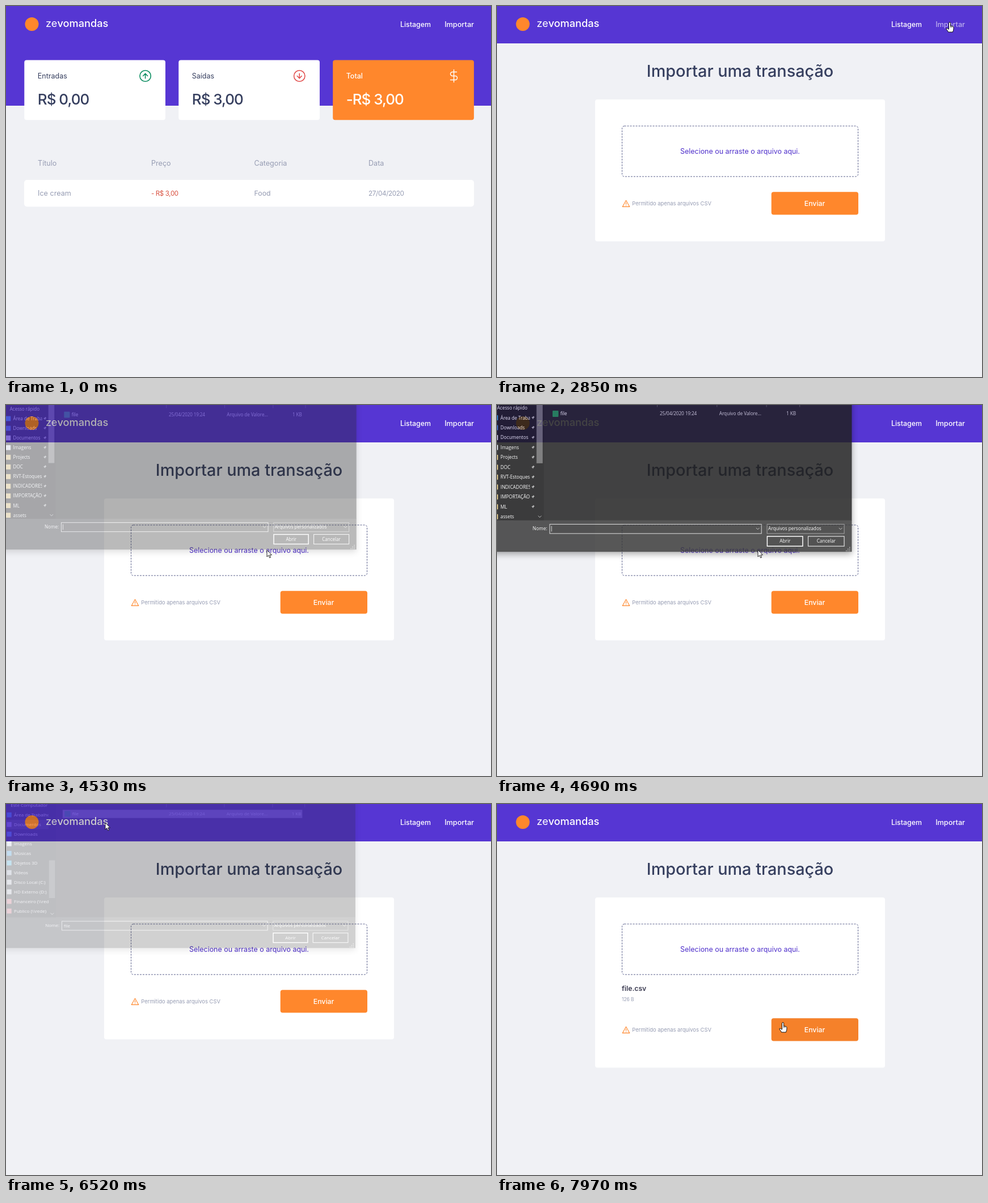
An HTML page for the animation above (8000 ms loop, 855x655 px).

```html
<!DOCTYPE html>
<html lang="pt-BR">
<head>
<meta charset="utf-8">
<title>Importar uma transação</title>
<style>
html, body { margin: 0; width: 100%; height: 100%; overflow: hidden; background: #f0f1f5; }
svg { display: block; width: 100vw; height: 100vh; }
text { font-family: Inter, "Open Sans", sans-serif; white-space: pre; }
#dialog text { font-family: "Open Sans", "Noto Sans", sans-serif; font-size: 8.3px; }
#dialog { filter: drop-shadow(0 4px 6px rgba(0, 0, 0, .4)); }
</style>
</head>
<body>
<svg id="stage" viewBox="0 0 855 655" xmlns="http://www.w3.org/2000/svg"></svg>
<script>
const LOOP = 8000;
const PURPLE = '#5636d3', ORANGE = '#ff872c', NAVY = '#363f5f', GREY = '#969cb3';
const stage = document.getElementById('stage');

// Markup helpers
const text = (x, y, str, size, fill, weight = 400, extra = '') =>
  `<text x="${x}" y="${y}" font-size="${size}" fill="${fill}" font-weight="${weight}" ${extra}>${str}</text>`;
const rect = (x, y, w, h, fill, extra = '') =>
  `<rect x="${x}" y="${y}" width="${w}" height="${h}" fill="${fill}" ${extra}/>`;
const line = (d, stroke, width, extra = '') =>
  `<path d="${d}" fill="none" stroke="${stroke}" stroke-width="${width}" stroke-linecap="round" stroke-linejoin="round" ${extra}/>`;
const MID = 'text-anchor="middle"', END = 'text-anchor="end"';

function summaryCard(x, label, value, fill, ink, icon) {
  return rect(x, 95.5, 248.7, 105.7, fill, 'rx="4"') +
    text(x + 23.5, 128, label, 12.5, ink, ink === '#fff' ? 500 : 400) +
    text(x + 23.5, 174, value, 26, ink, 500, 'letter-spacing="-1"') + icon;
}

function roundArrow(x, color, dir) {
  const tip = 123.5 - 4.2 * dir, wing = tip + 4.2 * dir;
  return `<circle cx="${x}" cy="123.5" r="9.7" fill="none" stroke="${color}" stroke-width="1.6"/>` +
    line(`M${x} ${123.5 + 4.2 * dir}V${tip}M${x - 4} ${wing}L${x} ${tip}L${x + 4} ${wing}`, color, 1.6);
}

function listPage() {
  const cols = [56, 256, 437.5, 639];
  const heads = ['Título', 'Preço', 'Categoria', 'Data'];
  const dollar = line('M12 1v22M17 5H9.5a3.5 3.5 0 0 0 0 7h5a3.5 3.5 0 0 1 0 7H6', '#fff', 1.4,
    'transform="translate(777.5 111.5)"');
  return rect(0, 0, 855, 176, PURPLE) +
    summaryCard(32.3, 'Entradas', 'R$ 0,00', '#fff', NAVY, roundArrow(245.6, '#0f8f63', 1)) +
    summaryCard(304.3, 'Saídas', 'R$ 3,00', '#fff', NAVY, roundArrow(517.3, '#e2504f', -1)) +
    summaryCard(576.2, 'Total', '-R$ 3,00', ORANGE, '#fff', dollar) +
    heads.map((h, i) => text(cols[i], 281.5, h, 12.6, GREY)).join('') +
    rect(32, 307, 793, 47.3, '#fff', 'rx="5"') +
    text(cols[0], 335, 'Ice cream', 12.6, GREY) +
    text(cols[1], 335, '- R$ 3,00', 11.6, '#d9503f', 400, 'letter-spacing="-.4"') +
    text(cols[2], 335, 'Food', 12.3, GREY) +
    text(cols[3], 335, '27/04/2020', 11.7, GREY, 400, 'letter-spacing="-.35"');
}

function importPage() {
  return rect(0, 0, 855, 66, PURPLE) +
    text(428.5, 124.5, 'Importar uma transação', 28.8, NAVY, 500, MID) +
    rect(173, 165, 511, 250.5, '#fff', 'rx="4" id="card"') +
    rect(220.5, 211.9, 416, 89.2, 'none', 'rx="4" stroke="#5b608c" stroke-dasharray="3 2"') +
    text(428.5, 261, 'Selecione ou arraste o arquivo aqui.', 12.45, '#4f30cb', 400, MID) +
    `<g id="file">${text(220, 330, 'file.csv', 12.2, '#3a3a50', 600)}${text(220, 348, '126 B', 8.4, GREY)}</g>` +
    '<g id="actions">' +
    line('M227.5 343.2L221.2 354.4H233.8Z', ORANGE, 1.1) + line('M227.5 347.2v3M227.5 352.3v.1', ORANGE, 1.1) +
    text(238.3, 352.2, 'Permitido apenas arquivos CSV', 9.4, GREY) +
    rect(483.7, 328.3, 153.3, 40.3, ORANGE, 'rx="4" id="send"') +
    text(560, 353, 'Enviar', 12.3, '#fff', 500, MID) + '</g>';
}

const header =
  `<circle cx="45.5" cy="32" r="12" fill="${ORANGE}"/>` +
  text(70, 37, 'ze<tspan font-weight="500">vomandas</tspan>', 18.2, '#fff') +
  text(749, 37, 'Listagem', 12.4, '#fff', 500, END) +
  text(825, 37, 'Importar', 12.7, '#fff', 500, END + ' id="nav"');

// File dialog
const ROW = 17.6;
const pinned = ['Área de Trabalho', 'Downloads', 'Documentos', 'Imagens', 'Projects', 'DOC',
  'RVT-Estoques', 'INDICADORES', 'IMPORTAÇÃO', 'ML', 'assets'];
const places = ['Área de Trabalho', 'Documentos', 'Downloads', 'Imagens', 'Músicas', 'Objetos 3D',
  'Vídeos', 'Disco Local (C:)', 'HD Externo (D:)', 'Financeiro (\\\\rede)', 'Publico (\\\\rede)'];

function sidebar(id, title, top, items, clip, color) {
  const rows = items.map((name, i) => {
    const y = top + (i + 1) * ROW;
    return rect(-9, y - 4.5, 8.5, 9, color(i)) + text(4, y + 3, name, 8.3, '#fff');
  }).join('');
  return `<g id="${id}"><g clip-path="url(#${clip})">${text(-2, top + 3, title, 8.3, '#fff')}${rows}</g>`;
}

function pin(y) {
  return `<path d="M58.5 ${y + 3.5}l2.4-2.6-2-1.6 1.8-.4 1.8-2 2 2-2 1.9-.2 1.8-1.4-1.6z" fill="#aaa"/>`;
}

function dialogMarkup() {
  const chevron = (x, y) => line(`M${x - 2.6} ${y - 1.3}l2.6 2.6 2.6-2.6`, '#ccc', .9);
  const box = (x, y, w, h, stroke, width) =>
    rect(x, y, w, h, '#333', `stroke="${stroke}" stroke-width="${width}"`);
  const grip = [[624, 253], [624, 256], [621, 256], [624, 259], [621, 259], [618, 259]]
    .map(([x, y]) => rect(x - .5, y - 1, 1.5, 1.5, '#bbb')).join('');
  const folders = i => ['#2d9be0', '#3d7fd0', '#d8d8e0', '#dfe8ee'][i] || '#e6c878';
  const drives = i => ['#1d8fe0', '#8f86c8', '#3a8fe0', '#e3edf3', '#2d9be0', '#38b6e0',
    '#a9b4c0', '#c4c8cc', '#c4c8cc'][i] || '#d86a76';
  return rect(-60, -160, 688, 365, '#202020') + rect(-60, -160, 141, 365, '#191919') +
    rect(-60, 204.5, 688, 56, '#383838') +
    [282, 388, 476, 535].map(x => rect(x, -10, 1, 13, '#555')).join('') +
    sidebar('quick', 'Acesso rápido', 4.5, pinned, 'narrow', folders) +
    pinned.slice(0, 10).map((_, i) => pin(4.5 + (i + 1) * ROW)).join('') +
    rect(68, -60, 11, 163, '#6b6b6b') + '</g>' +
    `<g id="placesBack">${rect(-60, 26, 127, 17, '#333')}</g>` +
    sidebar('places', 'Este Computador', -.8, places, 'wide', drives) +
    rect(68, 100, 11, 69, '#4d4d4d') + '</g>' +
    chevron(73.8, 198) +
    rect(93, 7.5, 438, 15, '#777', 'id="row"') +
    rect(96.5, 9.5, 10.5, 11, '#1f8a4c', 'rx="1"') +
    text(110.5, 18, 'file', 8.3, '#fff') +
    text(287, 18, '25/04/2020 19:24', 8.3, '#ddd', 400, 'letter-spacing="-.1"') +
    text(392.5, 18, 'Arquivo de Valore...', 8.3, '#ddd') +
    text(529, 18, '1 KB', 8.3, '#ddd', 400, END) +
    text(87, 222, 'Nome:', 8.3, '#fff', 400, END) +
    box(91.5, 211.5, 376, 16.5, '#ddd', 1) + chevron(461, 219.5) +
    rect(94.3, 214.5, .8, 10, '#fff', 'id="caret"') +
    text(95, 222.5, 'file', 8.3, '#fff', 400, 'id="name"') +
    box(477.5, 211.5, 137, 16.5, '#999', 1) + chevron(608, 219.5) +
    text(479.5, 222.3, 'Arquivos personalizados', 8.3, '#fff') +
    box(477.8, 233, 63, 17.5, '#fff', 1.5) + text(509.5, 244.5, 'Abrir', 8.3, '#fff', 400, MID) +
    box(550.5, 233, 64, 17.5, '#ddd', 1.2) + text(582.5, 244.5, 'Cancelar', 8.3, '#fff', 400, MID) + grip;
}

const cursorMarkup =
  '<path id="arrow" d="M0 0V12L2.8 9.4 4.7 13.8 6.6 13 4.8 8.8H8.5z" fill="#fff" stroke="#111" stroke-width=".9"/>' +
  '<g id="hand" stroke="#111" stroke-width="1" stroke-linejoin="round">' +
  '<path d="M-1.5 1.2a1.5 1.5 0 0 1 3 0V6q4 .3 5 1.5 .6 .6 .4 4 -.2 3 -1.6 5.5H-2.5q-.8 -2.5 -3.4 -5 -.6 -1.8 .9 -1.9 1.6 .2 3 2.2L-1.5 11z" fill="#fff"/>' +
  '<path d="M1.5 6v3M3.8 6.5v2.8" fill="none" stroke-width=".8"/></g>' +
  '<g id="busy" fill="none" stroke-width="2"><circle r="4.6" stroke="#9fd8ee"/>' +
  '<path d="M0-4.6A4.6 4.6 0 0 1 4.6 0" stroke="#1b7fc4"/></g>';

stage.innerHTML =
  '<defs><clipPath id="narrow"><path d="M-60-60H56.5V204H-60z"/></clipPath>' +
  '<clipPath id="wide"><path d="M-60-60H67V204H-60z"/></clipPath></defs>' +
  rect(0, 0, 855, 655, '#f0f1f5') +
  `<g id="list">${listPage()}</g><g id="import">${importPage()}</g>${header}` +
  `<g id="dialog">${dialogMarkup()}</g><g id="cursor">${cursorMarkup}</g>`;

const el = {};
stage.querySelectorAll('[id]').forEach(node => el[node.id] = node);
const set = (id, name, value) => el[id].setAttribute(name, value);
const show = (id, on) => set(id, 'display', on ? 'inline' : 'none');

// Timing
const ramp = (t, a, b) => Math.min(1, Math.max(0, (t - a) / (b - a)));
const ease = u => u * u * (3 - 2 * u);

// Cursor moves: start, end, x, y, sideways bend
const moves = [
  [300, 680, 700, 469, 0],
  [850, 1060, 642, 367, 0],
  [1240, 2070, 780, 58, 0],
  [2080, 2540, 798, 29, 0],
  [3000, 3610, 461, 255, 0],
  [3915, 3920, 460, 256, 0],
  [4960, 5790, 167, 27, 0],
  [5875, 6120, 150, 14, 0],
  [6360, 6520, 175, 33, 0],
  [6525, 6670, 219, 141, 0],
  [6675, 7050, 453, 264, 0],
  [7360, 7970, 504, 386, -52]
];

function cursorAt(t) {
  let x = 780, y = 662;
  for (const [a, b, tx, ty, bend] of moves) {
    if (t <= a) break;
    const e = ease(ramp(t, a, b));
    x += (tx - x) * e + 4 * e * (1 - e) * bend;
    y += (ty - y) * e;
  }
  return [x, y];
}

const within = (x, y, l, t, r, b) => x >= l && x <= r && y >= t && y <= b;

function draw(t) {
  const importing = t >= 2690;
  const loaded = t >= 6590;
  const open = t >= 4530 && t < 6590;
  const busy = t >= 3920 && t < 4530;
  const picked = t >= 6200;
  const shift = loaded ? 50 : 0;

  show('list', !importing);
  show('import', importing);
  show('file', loaded);
  set('card', 'height', 250.5 + shift);
  set('actions', 'transform', `translate(0 ${shift})`);
  set('nav', 'opacity', 1 - .4 * (ramp(t, 2300, 2500) - ramp(t, 3070, 3270)));
  const hover = ramp(t, 7740, 7940);
  set('send', 'fill', `rgb(${255 - 10 * hover},${135 - 6 * hover},${44 - 2 * hover})`);

  show('dialog', open);
  const fadeIn = 1 - (1 - ramp(t, 4460, 4870)) ** 2.2;
  const fadeOut = (1 - ramp(t, 6440, 6590)) ** 1.9;
  const k = fadeIn * fadeOut;
  set('dialog', 'opacity', k);
  set('dialog', 'transform', `translate(288 85) scale(${.954 + .046 * k}) translate(-288 -85)`);
  const scrolled = t >= 5190;
  show('quick', !scrolled);
  show('places', scrolled);
  show('placesBack', scrolled);
  show('row', picked);
  show('name', picked);
  show('caret', !picked);

  const [x, y] = cursorAt(t);
  const onLink = within(x, y, 772, 22, 826, 44);
  const onZone = importing && within(x, y, 220, 211, 637, 302);
  const onSend = importing && within(x, y, 484, 328 + shift, 637, 369 + shift);
  const hand = !open && !busy && (onLink || onZone || onSend);
  set('cursor', 'transform', `translate(${x} ${y})`);
  show('hand', hand);
  show('arrow', !hand);
  show('busy', busy);
  set('busy', 'transform', `translate(10 0) rotate(${ramp(t, 3920, 4380) * 300})`);
}

const start = performance.now();
function tick() {
  draw((performance.now() - start) % LOOP);
  requestAnimationFrame(tick);
}
tick();
</script>
</body>
</html>
```
